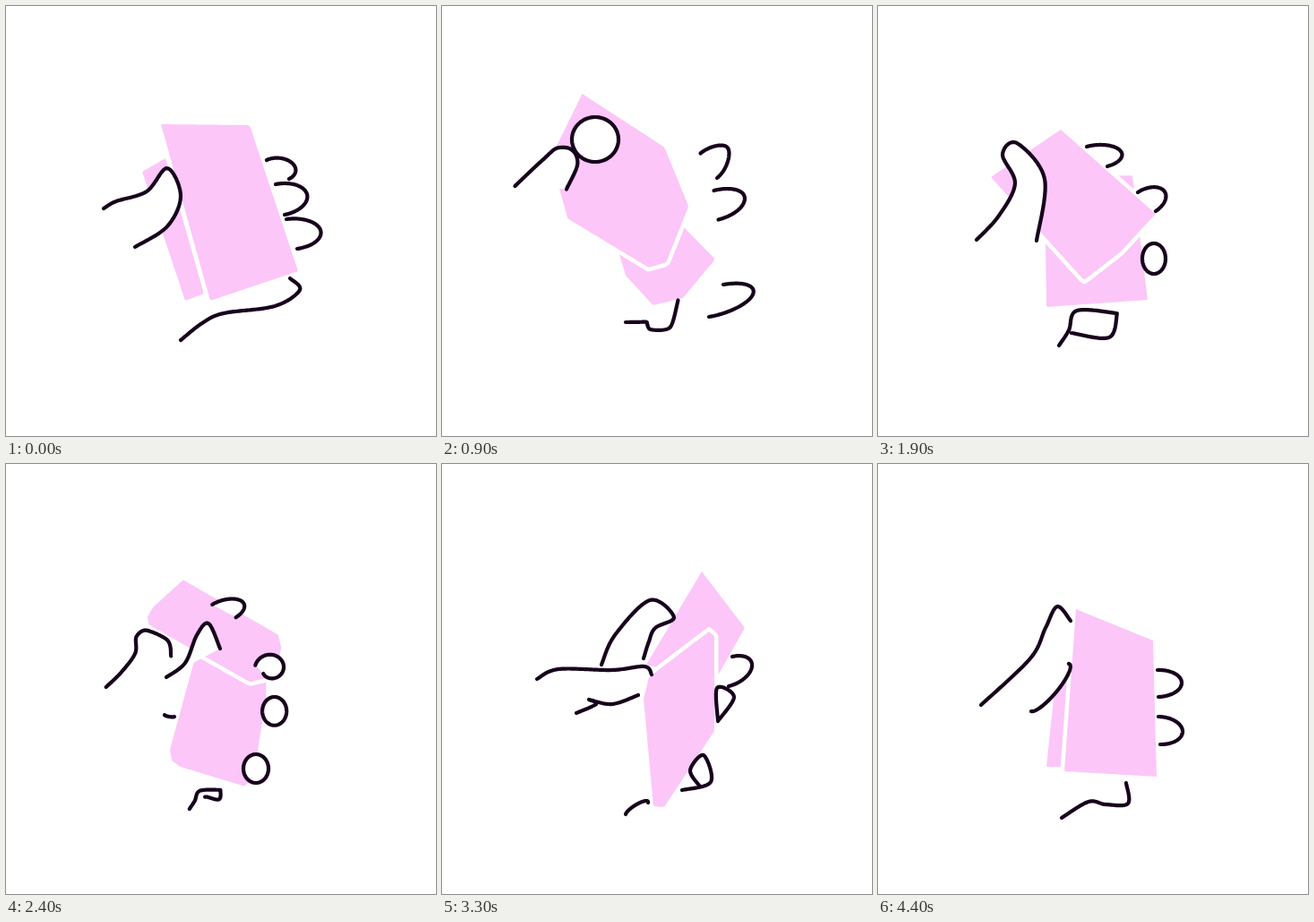
These frames come from a looping animation (480 by 480 pixels, 4.5 s). An HTML page with a canvas:

```html
<!DOCTYPE html>
<html lang="en">
<head>
<meta charset="utf-8">
<title>Card shuffle</title>
<style>
  html, body { margin: 0; width: 100%; height: 100%; overflow: hidden; background: #fff; }
  canvas { display: block; width: 480px; height: 480px; }
</style>
</head>
<body>
<canvas id="stage" width="480" height="480"></canvas>
<script>
const LOOP = 4500, STEPS = 43, LIFT = 15;
const PINK = '#fcc6f9', INK = '#17031c';
const CARDS = ['a', 'b'];
const STROKES = ['f1', 'f2', 'f3', 'f4', 'heel', 'pinky', 'thumb', 'low', 'tip'];
const ctx = document.getElementById('stage').getContext('2d');

// Packets a and b are given by their corners. A stroke is an oval (centre,
// radii), an arch (start, tip, end) or, with more points, a smooth line
// on which a repeated point makes a corner.
const poses = [
  { at: 0,
    a: '173,132 272,133 326,296 228,329',
    b: '178,170 221,321 200,329 152,185',
    thumb: '109,226 123,218 157,207 180,181 195,212 180,246 144,269',
    f1: '291,172 319,175 316,193',
    f2: '301,199 336,210 311,233',
    f3: '313,238 351,250 325,271',
    pinky: '195,373 219,354 243,343 300,335 328,317 317,304' },
  { at: 4,
    a: '186,107 293,146 296,298 163,268',
    b: '173,277 278,299 182,327',
    thumb: '108,198 137,166 156,133 177,140 171,168',
    low: '163,194 158,207 148,232',
    f1: '300,182 322,187 323,207',
    f2: '303,213 346,225 301,254',
    heel: '253,341 198,356 202,385 240,384 266,362',
    pinky: '229,326 261,333 261,333 258,355 288,358 283,310' },
  { at: 12,
    a: '127,119 256,254 188,321 69,178',
    b: '192,178 267,147 332,264 297,342 252,352 231,282',
    thumb: '55,234 88,206 113,196 131,228 107,271',
    tip: '171,149 26,25',
    f1: '277,147 318,132 291,177',
    f2: '304,199 331,203 316,223',
    f4: '314,311 347,322 298,347',
    pinky: '181,380 212,364 244,347' },
  { at: 17,
    a: '204,138 310,232 270,275 230,306 126,191',
    b: '186,192 284,189 301,328 188,336',
    thumb: '110,261 135,234 153,198 139,166 155,153 186,193 177,262',
    f1: '233,157 270,161 256,179',
    f2: '290,208 319,206 310,229',
    f3: '308,282 13,17',
    pinky: '202,379 213,362 222,340 267,343 267,343 258,370 216,365' },
  { at: 26,
    a: '193,149 322,192 333,225 166,193 167,180',
    b: '238,210 300,222 291,288 250,384 187,340 179,316',
    thumb: '113,266 140,246 172,232 190,203',
    tip: '179,238 200,222 213,191 226,178 239,206',
    low: '177,280 182,282 188,282',
    f1: '228,157 256,146 257,165',
    f2: '286,238 17,17',
    f3: '293,271 14,15',
    f4: '279,340 14,16',
    pinky: '207,390 218,380 227,377' },
  { at: 31,
    a: '290,120 338,183 304,243 228,224',
    b: '298,187 304,192 304,298 248,383 236,382 225,262 231,238',
    thumb: '106,240 130,229 190,230 226,226 234,235',
    tip: '178,224 193,191 232,152 259,171 238,183 231,198 225,217',
    low: '219,258 190,268 164,263 164,263 172,268 150,278',
    f2: '324,215 346,226 320,248',
    f3: '308,287 307,250 326,260 308,287',
    f4: '268,364 300,355 292,325 277,342 288,360',
    pinky: '205,391 219,379 230,378' },
  { at: 42,
    a: '214,225 204,338 188,338 196,262',
    b: '221,162 307,197 311,349 208,343',
    thumb: '115,269 170,217 187,183 200,159 215,175',
    low: '171,276 201,252 213,223',
    f2: '312,230 339,244 313,260',
    f3: '313,282 340,298 315,313',
    pinky: '205,395 235,377 254,380 279,379 277,356' }
];

const parse = s => s.split(' ').map(p => p.split(',').map(Number));
const mix = (p, q, k) => p.map((v, i) => v + (q[i] - v) * k);
const range = (n, fn) => Array.from({ length: n + 1 }, (_, i) => fn(i / n));

function oval([[cx, cy], [rx, ry]]) {
  return range(90, u => {
    const a = 2 * Math.PI * u;
    return [cx - rx * Math.cos(a), cy - ry * Math.sin(a)];
  });
}

function arch([from, tip, to]) {
  const mid = mix(from, to, 0.5);
  return range(90, u => {
    const a = Math.PI * u;
    return mid.map((m, c) => m + (from[c] - m) * Math.cos(a) + (tip[c] - m) * Math.sin(a));
  });
}

function smooth(p) {
  const same = (q, r) => !r || (q[0] === r[0] && q[1] === r[1]);
  const out = [];
  for (let i = 0; i < p.length - 1; i++) {
    const p1 = p[i], p2 = p[i + 1];
    if (same(p1, p2)) continue;
    // Do not let the bend reach across a corner.
    const p0 = same(p1, p[i - 1]) ? p1 : p[i - 1];
    const p3 = same(p2, p[i + 2]) ? p2 : p[i + 2];
    out.push(...range(16, u => p1.map((v, c) => v + 0.5 * u * (p2[c] - p0[c] +
      u * (2 * p0[c] - 5 * v + 4 * p2[c] - p3[c] +
      u * (3 * (v - p2[c]) + p3[c] - p0[c]))))));
  }
  return out;
}

// Spread points evenly along a line, so that any two lines can be mixed.
function even(line, n) {
  const sum = [0];
  for (let i = 1; i < line.length; i++) {
    sum.push(sum[i - 1] + Math.hypot(line[i][0] - line[i - 1][0], line[i][1] - line[i - 1][1]));
  }
  let j = 1;
  return range(n, u => {
    const d = u * sum[sum.length - 1];
    while (j < line.length - 1 && sum[j] < d) j++;
    return mix(line[j - 1], line[j], (d - sum[j - 1]) / (sum[j] - sum[j - 1] || 1));
  });
}

function card(text) {
  const p = parse(text);
  return even([...p, p[0]], 160);
}

function stroke(text) {
  const p = parse(text);
  const shape = p.length === 2 ? oval : p.length === 3 ? arch : smooth;
  return even(shape(p), 90);
}

for (const pose of poses) {
  for (const name of CARDS) pose[name] = card(pose[name]);
  for (const name of STROKES) if (pose[name]) pose[name] = stroke(pose[name]);
}
// The packets have traded places when the loop closes.
poses.push({ ...poses[0], at: STEPS, a: poses[0].b, b: poses[0].a });

function paint(pts, fill, line, width) {
  ctx.beginPath();
  for (const [x, y] of pts) ctx.lineTo(x, y);
  ctx.fillStyle = fill;
  ctx.strokeStyle = line;
  ctx.lineWidth = width;
}

function drawCard(pts) {
  paint(pts, PINK, '#fff', 9);
  ctx.closePath();
  ctx.stroke();
  ctx.fill();
}

function drawStroke(pts) {
  paint(pts, '#fff', INK, 4.2);
  ctx.fill();
  ctx.stroke();
}

function draw(step) {
  const next = poses.findIndex(p => p.at > step);
  const from = poses[next - 1], to = poses[next];
  const k = (step - from.at) / (to.at - from.at);
  const lift = LIFT * Math.sin(Math.PI * k);

  // The thumb raises packet a on every move.
  const part = name => {
    const p = from[name], q = to[name];
    if (!p || !q) return k < 0.5 ? p : q;
    const up = name === 'a' || name === 'thumb' ? lift : 0;
    return p.map((pt, i) => {
      const [x, y] = mix(pt, q[i], k);
      return [x, y - up];
    });
  };

  ctx.fillStyle = '#fff';
  ctx.fillRect(0, 0, 480, 480);
  const order = step < 29 ? ['b', 'a'] : ['a', 'b'];
  order.map(part).forEach(drawCard);
  STROKES.map(part).filter(Boolean).forEach(drawStroke);
}

// Ten drawings a second; the first and the widest pose stay twice as long.
function stepAt(ms) {
  const n = Math.floor(ms / 100);
  return n - (n >= 1) - (n >= 14);
}

ctx.lineCap = ctx.lineJoin = 'round';
const start = performance.now();

function tick() {
  draw(stepAt((performance.now() - start) % LOOP));
  requestAnimationFrame(tick);
}
tick();
</script>
</body>
</html>
```
